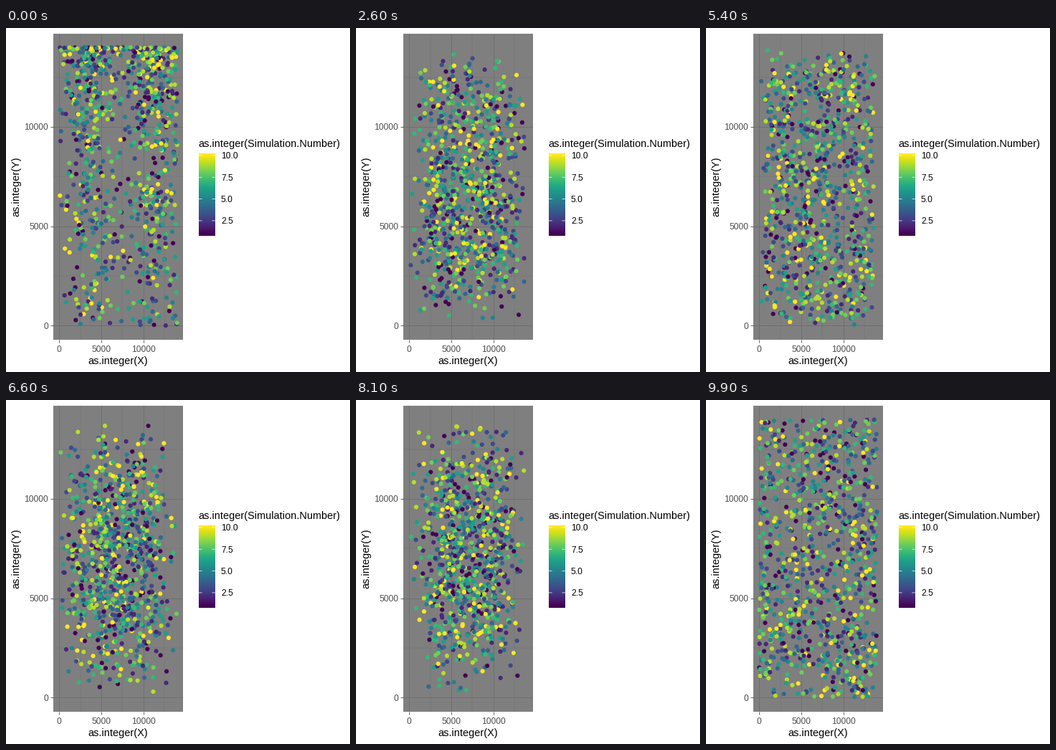
Recreate the animation shown at these times as a matplotlib script. Size 480 by 480 pixels, loop 10 s.

```python
import numpy as np
import matplotlib.pyplot as plt
from matplotlib.animation import FuncAnimation

SIZE, DPI = 480, 72          # at 72 dpi one point is one pixel
FRAMES, INTERVAL = 100, 100
SIMS, AGENTS, STEPS = 10, 90, 20
WORLD = 14000
TITLE, LABEL = 14.5, 12

plt.rcParams["font.family"] = "Liberation Sans"
rng = np.random.default_rng(12)
count = SIMS * AGENTS


def two_columns():
    """Start in two columns that are densest at the top."""
    x = rng.choice([0.27, 0.8], count) + rng.normal(0, 0.13, count)
    x = 1 - np.abs(1 - np.abs(x))
    y = 1 - rng.random(count) ** 1.8
    return WORLD * np.column_stack([x, y])


# Agents move in straight lines from one random state to the next
states = [two_columns(), *rng.uniform(0, WORLD, (STEPS, count, 2))]
sims = rng.permutation(np.repeat(np.arange(1, SIMS + 1), AGENTS))


def positions(frame):
    t = frame / (FRAMES - 1) * STEPS
    i = min(int(t), STEPS - 1)
    return states[i] + (states[i + 1] - states[i]) * (t - i)


fig = plt.figure(figsize=(SIZE / DPI, SIZE / DPI), dpi=DPI, facecolor="white")


def add_axes(left, top, right, bottom):
    return fig.add_axes([left / SIZE, 1 - bottom / SIZE,
                         (right - left) / SIZE, (bottom - top) / SIZE])


def label(x, y, text, size, va="baseline", **kw):
    fig.text(x / SIZE, 1 - y / SIZE, text, fontsize=size, va=va, **kw)


# Panel
ax = add_axes(66, 7.6, 247, 434.8)
ax.set_facecolor("#7f7f7f")
ax.spines[:].set_visible(False)
ax.set_axisbelow(True)
limits = (-0.05 * WORLD, 1.05 * WORLD)
ax.set(xlim=limits, ylim=limits)
for axis in (ax.xaxis, ax.yaxis):
    axis.set_ticks(range(0, WORLD, 5000))
    axis.set_ticks(range(2500, WORLD, 5000), minor=True)
ax.grid(which="major", color="#6b6b6b", lw=0.75)
ax.grid(which="minor", color="#6b6b6b", lw=0.4)
ax.tick_params(which="minor", length=0)
ax.tick_params(length=3.7, width=0.75, color="#333333",
               labelcolor="#4d4d4d", labelsize=LABEL)
ax.tick_params(axis="x", pad=4)
ax.tick_params(axis="y", pad=3)
label(156.5, 469, "as.integer(X)", TITLE, ha="center")
label(21.3, 221, "as.integer(Y)", TITLE, va="center", ha="right", rotation=90)

# Colour bar
label(268.5, 166, "as.integer(Simulation.Number)", TITLE)
top, bottom, bins = 175, 290, 20
bar = add_axes(269, top, 292, bottom)
bar.imshow(np.linspace(1, SIMS, bins)[:, None], cmap="viridis",
           origin="lower", aspect="auto", interpolation="bilinear",
           extent=(0, 1, 0, bins))
bar.axis("off")
for value in np.arange(2.5, SIMS + 1, 2.5):
    y = 0.5 + (value - 1) / (SIMS - 1) * (bins - 1)
    bar.hlines([y, y], [0, 0.8], [0.2, 1], color="white", lw=0.7, snap=False)
    label(300, bottom - y * (bottom - top) / bins + 4.3, f"{value:.1f}", LABEL)
bar.set(xlim=(0, 1), ylim=(0, bins))

dots = ax.scatter(*positions(0).T, c=sims, cmap="viridis", vmin=1, vmax=SIMS,
                  s=6.15 ** 2, linewidths=0, zorder=3)


def update(frame):
    dots.set_offsets(positions(frame))
    return [dots]


anim = FuncAnimation(fig, update, frames=FRAMES, interval=INTERVAL,
                     repeat=True, repeat_delay=0)
plt.show()
```
